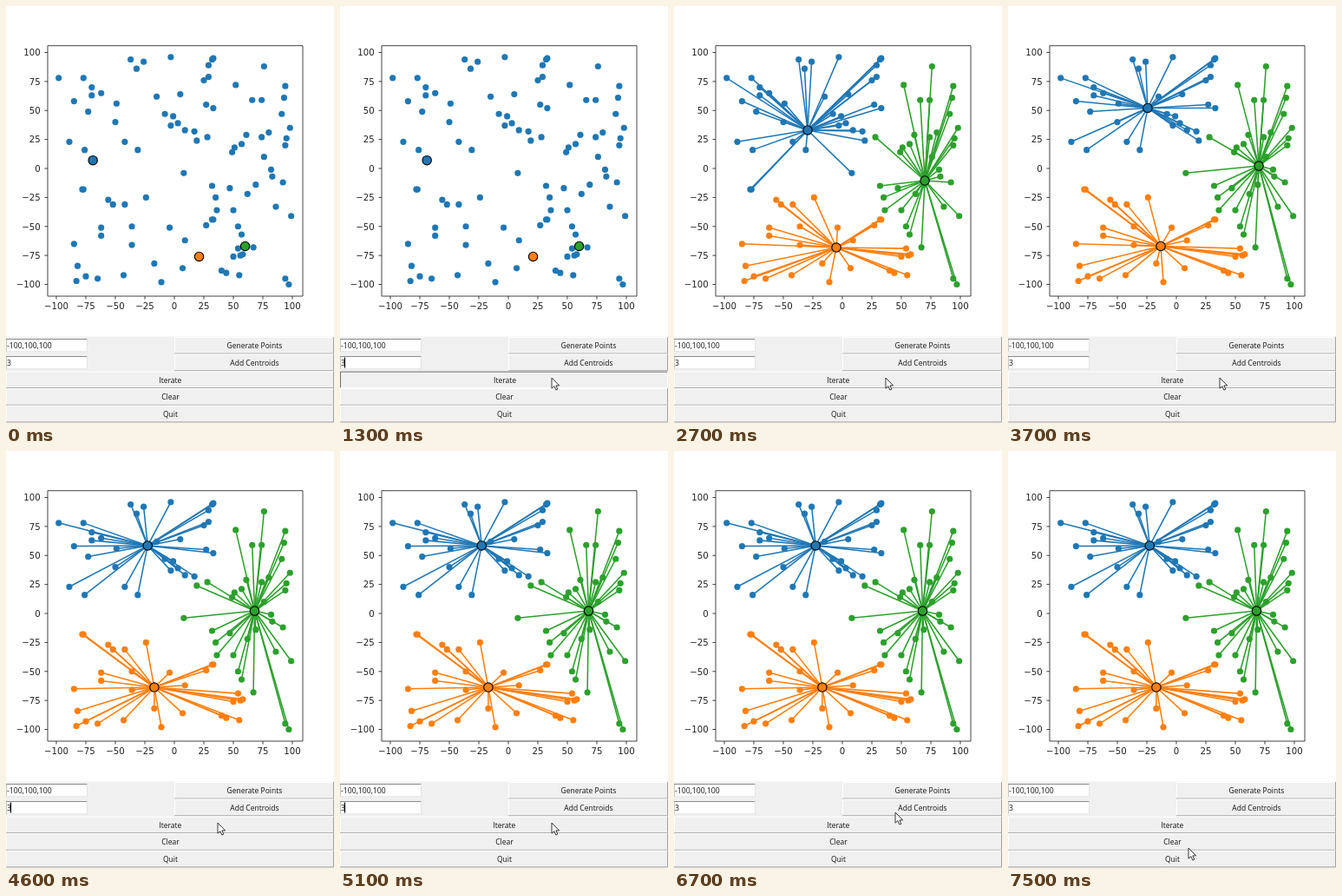
Animation of 378 by 480 pixels, one loop 7600 ms. Source, as an HTML page:

```html
<!DOCTYPE html>
<html lang="en">
<head>
<meta charset="utf-8">
<title>K-means demo</title>
<style>
  html, body { margin: 0; width: 100%; height: 100%; overflow: hidden; background: #fff; }
  svg { display: block; width: 378px; height: 480px; }
  .tick { font: 10.2px "DejaVu Sans", sans-serif; fill: #222; }
  .ui { font: 8.5px "Open Sans", "Noto Sans", sans-serif; fill: #111; }
  .entry { font-size: 8.7px; }
</style>
</head>
<body>
<svg id="stage" viewBox="0 0 378 480"></svg>
<script>
const LOOP = 7600, STEP = 100;
const COLORS = ['#1f77b4', '#ff7f0e', '#2ca02c'];
const stage = document.getElementById('stage');

const upperLeft = [
  [-98,78],[-77,78],[-37,94],[-26,92],[-32,86],[-3,96],[-70,70],[-70,63],[-62,65],[-85,58],[-73,49],
  [-49,56],[-50,40],[-15,62],[5,64],[-8,47],[-1,45],[-3,37],[3,39],[9,33],[17,32],[19,24],
  [-89,23],[-76,16],[-42,23],[-31,16],[25,76],[29,79],[29,89],[32,94],[33,95],[27,55],[33,52]
];
const right = [
  [28,27],[76,88],[52,72],[66,59],[74,59],[94,71],[93,61],[91,47],[98,35],[95,26],[94,20],[80,31],
  [74,27],[61,29],[57,21],[51,18],[49,14],[76,10],[82,-1],[83,-7],[92,-12],[69,-14],[62,-22],[47,-17],
  [32,-15],[35,-25],[36,-36],[50,-36],[86,-33],[99,-41],[54,-50],[57,-57],[67,-68],[94,-95],[97,-100],[8,-4]
];
const lowerLeft = [
  [-78,-18],[-77,-18],[-56,-27],[-52,-31],[-42,-31],[-24,-25],[-62,-51],[-62,-58],[-85,-65],[-36,-50],
  [-36,-66],[-4,-51],[9,-62],[27,-49],[32,-44],[33,-44],[-82,-84],[-83,-97],[-75,-93],[-65,-95],[-43,-92],
  [-17,-82],[-11,-98],[7,-86],[54,-69],[50,-76],[56,-75],[58,-74],[40,-88],[44,-90],[55,-92]
];
const points = [...upperLeft, ...right, ...lowerLeft];

// Centroids (blue, orange, green) and the moment each iteration is drawn
const iterations = [
  { at: 0,    centroids: [[-69, 7], [21, -76], [60, -67]] },
  { at: 1700, centroids: [[-29.4, 33], [-5.1, -68.2], [69.9, -10.5]] },
  { at: 3300, centroids: [[-24.3, 52.1], [-13.2, -67], [69.9, 2.2]] },
  { at: 4500, centroids: [[-22.6, 58.5], [-17, -63.7], [68, 2.2]] }
];
const presses = [[1200, 1700], [2900, 3300], [4100, 4500], [5500, 5800]];
const cursorPath = [
  [900, 262, 459], [1200, 244, 428], [6500, 244, 428], [6900, 266, 404], [7400, 210, 455], [7500, 208, 457]
];

function add(parent, tag, attrs, text) {
  const el = document.createElementNS('http://www.w3.org/2000/svg', tag);
  for (const key in attrs) el.setAttribute(key, attrs[key]);
  if (text !== undefined) el.textContent = text;
  parent.append(el);
  return el;
}
const group = (parent = stage) => add(parent, 'g', {});
const rect = (parent, x, y, width, height, fill) => add(parent, 'rect', { x, y, width, height, fill });
const line = (parent, d, stroke, width = 1) =>
  add(parent, 'path', { d, stroke, 'stroke-width': width, fill: 'none' });
const show = (el, on) => el.setAttribute('visibility', on ? 'visible' : 'hidden');

const plotX = x => 194 + x * 1.36;
const plotY = y => 187 - y * 1.335;

function drawAxes() {
  for (let v = -100; v <= 100; v += 25) {
    const x = plotX(v), y = plotY(v), label = String(v).replace('-', '\u2212');
    line(stage, `M${x} 334v3.6M48 ${y}h-3.6`, '#222', 0.85);
    add(stage, 'text', { x, y: 349, class: 'tick', 'text-anchor': 'middle' }, label);
    add(stage, 'text', { x: 39.8, y: y + 3.8, class: 'tick', 'text-anchor': 'end' }, label);
  }
  line(stage, 'M48 45.7H342V334H48Z', '#222', 0.85);
}

function nearest([x, y], centroids) {
  const dist = centroids.map(([cx, cy]) => Math.hypot(x - cx, y - cy));
  return dist.indexOf(Math.min(...dist));
}

function drawIteration({ centroids }, index) {
  const g = group();
  for (const p of points) {
    const k = index ? nearest(p, centroids) : 0;
    const cx = plotX(p[0]), cy = plotY(p[1]);
    if (index) {
      const [mx, my] = centroids[k];
      line(g, `M${cx} ${cy}L${plotX(mx)} ${plotY(my)}`, COLORS[k], 1.55);
    }
    add(g, 'circle', { cx, cy, r: 3.6, fill: COLORS[k] });
  }
  centroids.forEach(([x, y], k) => add(g, 'circle', {
    cx: plotX(x), cy: plotY(y), r: 5.2, fill: COLORS[k], stroke: '#000', 'stroke-width': 1.1
  }));
  return g;
}

function drawButton(x, y, label, sunken = false) {
  const g = group(), w = 378 - x, h = 19.6, shift = sunken ? 0.6 : 0;
  rect(g, x, y, w, h, '#f0f0f0');
  const topLeft = `M${x + 0.5} ${y + h}V${y + 0.5}H378`;
  const bottomRight = `M${x} ${y + h - 0.5}H377.5V${y}`;
  line(g, topLeft, sunken ? '#6c6c6c' : '#fff');
  line(g, bottomRight, sunken ? '#fff' : '#a0a0a0');
  add(g, 'text', { x: x + w / 2 + 0.4 + shift, y: y + 12.9 + shift, class: 'ui', 'text-anchor': 'middle' }, label);
  return g;
}

function drawEntry(y, text) {
  rect(stage, 0, y, 94, 15, '#fff');
  line(stage, `M0 ${y + 0.5}H94`, '#8c8c8c');
  line(stage, `M0.3 ${y}v15`, '#8c8c8c', 0.6);
  line(stage, `M93.5 ${y}v15M0 ${y + 14.7}H94`, '#dedede', 0.8);
  add(stage, 'text', { x: 1, y: y + 11, class: 'ui entry' }, text);
}

drawAxes();
const plots = iterations.map(drawIteration);

rect(stage, 0, 380.5, 378, 99.5, '#f0f0f0');
drawEntry(383, '-100,100,100');
drawEntry(403, '3');
drawButton(194, 381, 'Generate Points');
drawButton(194, 400.7, 'Add Centroids');
drawButton(0, 420.6, 'Iterate');
const pressedButton = drawButton(0, 420.6, 'Iterate', true);
drawButton(0, 440.2, 'Clear');
drawButton(0, 459.8, 'Quit');
const caret = rect(stage, 5, 404.5, 1.1, 12, '#000');
const cursor = add(stage, 'path', {
  d: 'M0 0V12.2L2.9 9.6L4.9 14L6.8 13.1L4.9 8.9H8.7Z',
  fill: '#fff', stroke: '#222', 'stroke-width': 0.9, 'stroke-linejoin': 'round'
});

function cursorAt(t) {
  const i = cursorPath.findIndex(key => key[0] > t);
  if (i < 0) return cursorPath[cursorPath.length - 1].slice(1);
  const [t0, x0, y0] = cursorPath[i - 1], [t1, x1, y1] = cursorPath[i];
  const u = (t - t0) / (t1 - t0), e = u * u * (3 - 2 * u);
  return [x0 + (x1 - x0) * e, y0 + (y1 - y0) * e];
}

// The caret blinks with a 957 ms period, visible for the first 637 ms
const caretOn = t => t >= 1101 && (t - 1101) % 957 < 637;

function render(time) {
  const t = Math.floor((time % LOOP) / STEP) * STEP;
  const current = iterations.filter(it => it.at <= t).length - 1;
  plots.forEach((g, i) => show(g, i === current));
  show(pressedButton, presses.some(([down, up]) => t >= down && t < up));
  show(caret, caretOn(t));
  const visible = t >= cursorPath[0][0];
  show(cursor, visible);
  if (visible) cursor.setAttribute('transform', `translate(${cursorAt(t)})`);
}

const start = performance.now();
function tick() {
  render(performance.now() - start);
  requestAnimationFrame(tick);
}
tick();
</script>
</body>
</html>
```
